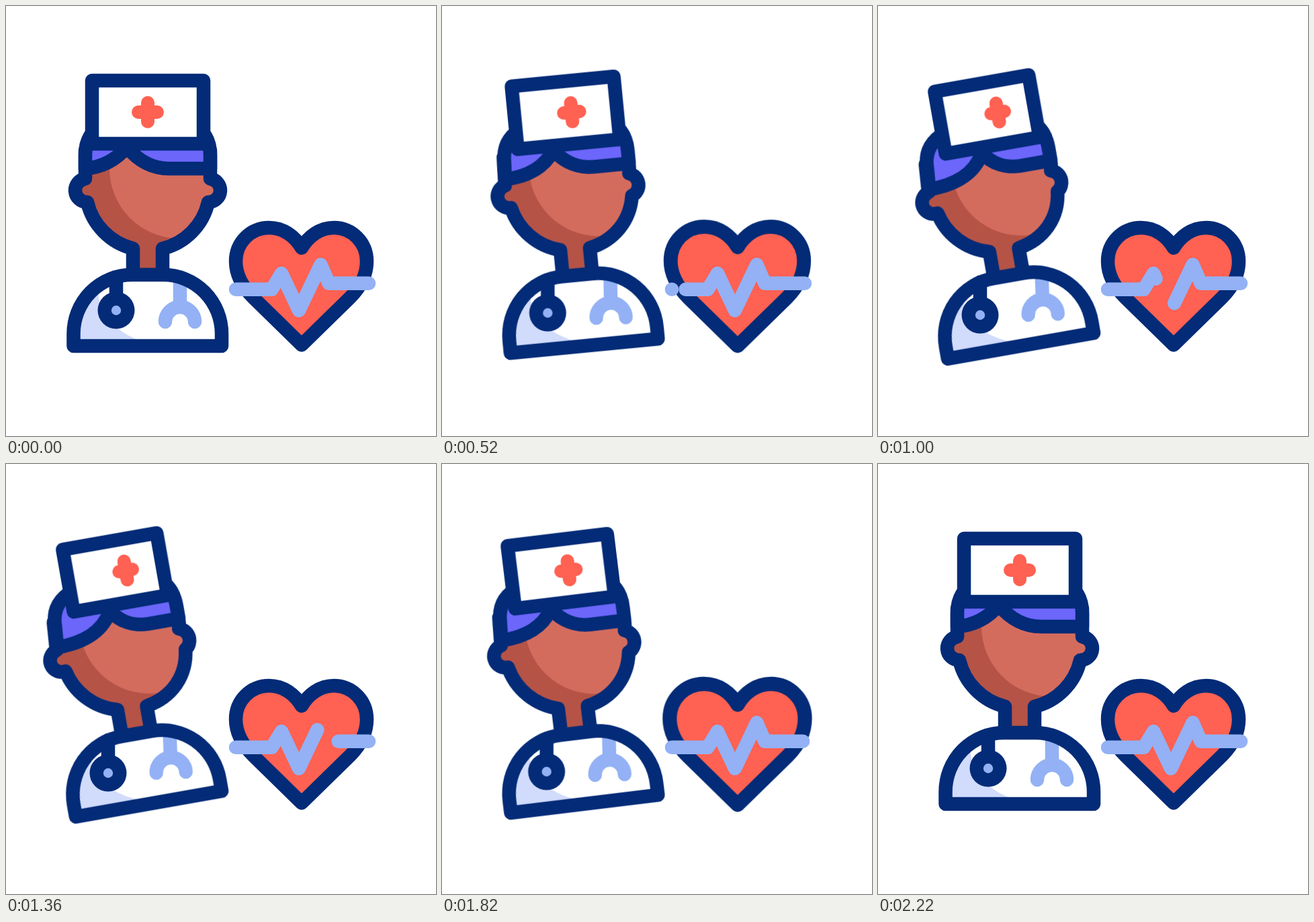
Recreate the animation shown at these times as an HTML page. Size 640x640 px, loop 2400 ms.

```html
<!DOCTYPE html>
<html lang="en">
<head>
<meta charset="utf-8">
<title>Nurse and heartbeat</title>
<style>
  html, body { margin: 0; width: 100%; height: 100%; overflow: hidden; background: #fff; }
  svg { display: block; width: 100vw; height: 100vh; }

  :root {
    --navy: #032b77;
    --red: #ff6152;
    --blue: #93b1f4;
    --ease: cubic-bezier(.33333, 0, .66667, 1);
  }

  path, circle { stroke-linecap: round; stroke-linejoin: round; }
  .line { stroke: var(--navy); stroke-width: 20.5; }
  .none { fill: none; }
  .blue { fill: none; stroke: var(--blue); stroke-width: 20.5; }

  .lean, .sway, .morph, .heart, .drawn, .erased {
    animation: 2400ms var(--ease) infinite;
  }

  /* whole figure tips to the left and back */
  .lean { transform-origin: 210px 506px; animation-name: lean; }
  @keyframes lean {
    0%, 8.3333%, 91.6667%, 100% { transform: translate(0px, 0px) rotate(0deg); }
    33.3333%, 66.6667% { transform: translate(1.8px, 0px) rotate(-10deg); }
  }

  /* hanging parts stay nearly upright */
  .sway { animation-name: sway; }
  @keyframes sway {
    0%, 8.3333%, 91.6667%, 100% { transform: translate(0px, 0px) rotate(0deg); }
    33.3333%, 66.6667% { transform: translate(var(--dx), var(--dy)) rotate(var(--tilt)); }
  }

  /* head turns: outlines move from --a to --b */
  .morph { d: var(--a); animation-name: morph; }
  @keyframes morph {
    0%, 8.3333%, 91.6667%, 100% { d: var(--a); }
    33.3333%, 66.6667% { d: var(--b); }
  }

  .face {
    --a: path("M118 215 L118 257 A17.6 17.6 0 0 0 121 292 A93 93 0 0 0 189 361 V402 H233 V361 C266.8 352.8 293.4 326 301 292 A17.6 17.6 0 0 0 304 257 L304 248 V215");
    --b: path("M118 215 L115 257 A17 17 0 0 0 123 290 A93 93 0 0 0 189 360 V402 H233 V362 C272.5 355.5 300 328 304.5 289 A17.6 17.6 0 0 0 300 257 L302 248 V215");
  }
  .hair {
    --a: path("M118 242 L118 222 C118 198 128 184 146 176 H276 C294 184 304 198 304 222 V242 H243 C220 242 198 232 180 210 C163 230 142 240 118 242 Z");
    --b: path("M117 253 L119.5 222 C119.5 199 131 185 147 177 H276 C293 184 302.5 198 302.5 222 V242 H256 C235 242 216 232 203.5 213 C187 243 156 253 117 253 Z");
  }
  .hat {
    --a: path("M128 111 H294 V205 H128 Z");
    --b: path("M150.2 111 H292.2 V205 H150.2 Z");
  }
  .cross {
    --a: path("M197 158 H225 M211 144 V172");
    --b: path("M227.2 158 H247.2 M237.2 144 V172");
  }

  .heart { transform-origin: 440px 417.5px; animation-name: beat; }
  @keyframes beat {
    0%, 16.6667%, 41.6667%, 58.3333%, 83.3333%, 100% { transform: scale(1); }
    29.1667%, 70.8333% { transform: scale(1.05); }
  }

  /* the old trace is wiped from the left while a new one follows */
  .drawn, .erased { stroke-dasharray: 1 2; }
  .drawn { animation-name: draw; }
  @keyframes draw {
    0%, 20.833% { stroke-dashoffset: 1; opacity: 0; }
    20.834% { opacity: 1; }
    79.1667%, 100% { stroke-dashoffset: 0; opacity: 1; }
  }
  .erased { animation-name: erase; }
  @keyframes erase {
    0%, 12.5% { stroke-dashoffset: 0; opacity: 1; }
    70.833% { stroke-dashoffset: -1; opacity: 1; }
    70.834% { opacity: 0; }
    100% { stroke-dashoffset: -1; opacity: 0; }
  }
</style>
</head>
<body>
<svg viewBox="0 0 640 640">
  <defs>
    <clipPath id="skin"><path class="face morph"/></clipPath>
    <path id="torso" d="M100.5 506 V488 A87 88 0 0 1 187.5 400 H234 A87 88 0 0 1 321 488 V506 Z"/>
    <clipPath id="coat"><use href="#torso"/></clipPath>
    <path id="trace" pathLength="1" d="M342 421.8 H395.5 L410 398 L436 453 L468.5 385 L480.5 412.8 H540"/>
  </defs>

  <g class="lean">
    <path class="face morph" fill="#b55347"/>
    <g clip-path="url(#skin)"><circle cx="258" cy="242" r="104" fill="#d46c5e"/></g>
    <path class="face morph line none"/>
    <path class="hair morph line" fill="#6c66fa"/>
    <path class="hat morph line" fill="#fff"/>
    <path class="cross morph" fill="none" stroke="#ff6152" stroke-width="20"/>
    <use href="#torso" fill="#fff"/>
    <path clip-path="url(#coat)" d="M90 400 H138 V428 C138 460 165 485 199 498 V510 H90 Z" fill="#d1dbfc"/>
  </g>

  <g class="sway" style="--dx:-12px;--dy:7px;--tilt:0deg">
    <path class="line none" d="M164 404 V440"/>
    <circle cx="164" cy="453" r="27.5" fill="#032b77"/>
    <circle cx="164" cy="453" r="7.2" fill="#93b1f4"/>
  </g>
  <g class="sway" style="--dx:-13.3px;--dy:-11px;--tilt:-2deg;transform-origin:259px 470px">
    <path class="blue" style="stroke-linecap:butt" d="M259 402 V447"/>
    <path class="blue" d="M237 470 A22 22 0 0 1 281 470"/>
  </g>

  <g class="lean"><use href="#torso" class="line none"/></g>

  <path class="heart line" fill="#ff6152" d="M440 504.5 L368 434 C351 417 342 400 342 380 C342 352 364 330 391.5 330 C413 330 430 343 440 360 C450 343 467 330 488 330 C515 330 537 352 537 380 C537 400 529 417 512 434 Z"/>
  <use href="#trace" class="blue erased"/>
  <use href="#trace" class="blue drawn"/>
</svg>
</body>
</html>
```
